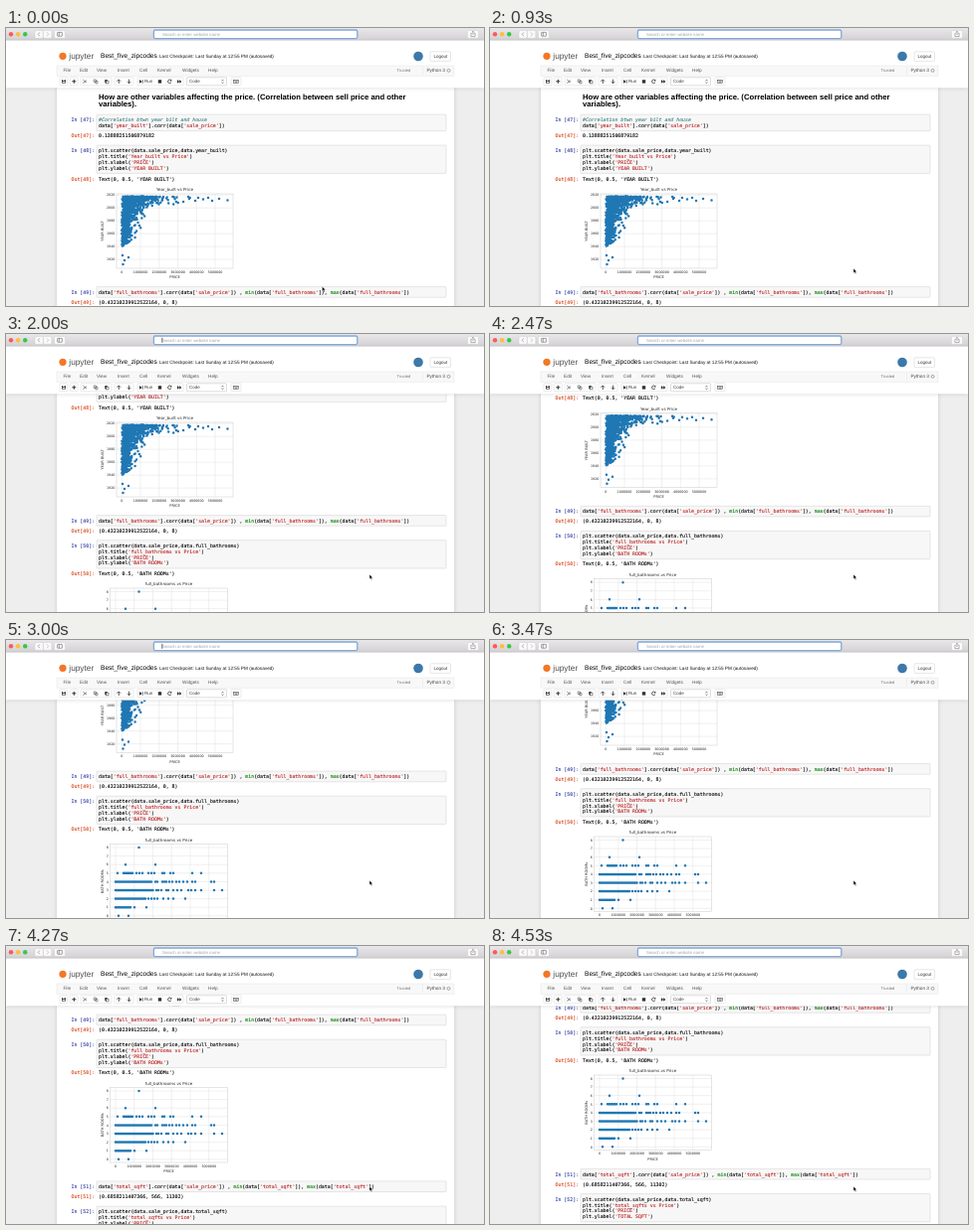
An HTML page for the animation above (4790 ms loop, 480x280 px).

```html
<!DOCTYPE html>
<html lang="en">
<head>
<meta charset="utf-8">
<title>Notebook scroll</title>
<style>
html, body { margin: 0; width: 100%; height: 100%; overflow: hidden; background: #fff; }
svg { display: block; width: 100vw; height: 100vh; }
text { font-family: "Liberation Sans", Arial, sans-serif; white-space: pre; text-rendering: geometricPrecision; }
.code { font: 4.9px "DejaVu Sans Mono", monospace; }
.code, .code tspan { fill: currentColor; stroke: currentColor; stroke-width: .1px; }
.plot { font: 3.3px "DejaVu Sans", sans-serif; fill: #262626; }
.raised { filter: drop-shadow(0 0 2px rgba(87, 87, 87, .25)); }
</style>
</head>
<body>
<svg id="stage" viewBox="0 0 480 280" xmlns="http://www.w3.org/2000/svg">
  <defs>
    <linearGradient id="bar" x2="0" y2="1"><stop stop-color="#e9e7e9"/><stop offset="1" stop-color="#d3d1d3"/></linearGradient>
    <clipPath id="view"><rect x="51" y="60.5" width="399" height="220"/></clipPath>
  </defs>
  <rect width="480" height="280" fill="#eee"/>
  <rect class="raised" x="51" y="50" width="399" height="240" fill="#fff"/>
  <g clip-path="url(#view)"><g id="page"></g></g>
  <g id="header"></g>
  <g id="chrome"></g>
  <path id="caret" d="M156.8 3.8v5" stroke="#222" stroke-width=".7"/>
  <path id="mouse" d="M0 0v4.6l1.1-1 .8 1.8.8-.4-.8-1.7h1.5z" fill="#000" stroke="#fff" stroke-width=".35"/>
</svg>
<script>
const LOOP = 4790, FRAME = 1000 / 15;
const $ = id => document.getElementById(id);
const esc = s => s.replace(/&/g, '&amp;').replace(/</g, '&lt;');

const text = (x, y, s, size, fill = '#333', extra = '') =>
  `<text x="${x}" y="${y}" font-size="${size}" fill="${fill}" ${extra}>${esc(s)}</text>`;
const rect = (x, y, w, h, fill, extra = '') =>
  `<rect x="${x}" y="${y}" width="${w}" height="${h}" fill="${fill}" ${extra}/>`;
const circle = (x, y, r, fill, extra = '') =>
  `<circle cx="${x}" cy="${y}" r="${r}" fill="${fill}" ${extra}/>`;
const line = (d, stroke = '#333', w = .6) =>
  `<path d="${d}" fill="none" stroke="${stroke}" stroke-width="${w}"/>`;
const shape = (d, fill = '#333') => `<path d="${d}" fill="${fill}"/>`;

// Notebook cells
const LEAD = 5.87, BASE = 1.5;
const code = (x, y, body, extra = '') => `<text class="code" x="${x}" y="${y}" ${extra}>${body}</text>`;
const span = (color, s, extra = '') => `<tspan color="${color}" ${extra}>${s}</tspan>`;

function paint(src) {
  if (src[0] === '#') return span('#408080', esc(src), 'font-style="italic"');
  return esc(src)
    .replace(/'[^']*'/g, s => span('#ba2121', s))
    .replace(/\b(min|max)(?=\()/g, s => span('#008000', s));
}

const prompt = (label, y, color) => code(89.1, y + BASE, label, `text-anchor="end" color="${color}"`);

function input(n, y, lines) {
  const h = lines.length * LEAD + 4.8;
  return prompt(`In [${n}]:`, y, '#303f9f') +
    rect(91, y - 5.6, 351, h, '#f7f7f7', 'stroke="#cfcfcf" stroke-width=".5" rx=".6"') +
    lines.map((s, i) => code(93, y + BASE + i * LEAD, paint(s))).join('');
}

const output = (n, y, s) => prompt(`Out[${n}]:`, y, '#d84315') + code(93, y + BASE, esc(s));

const corr = col => [`data['${col}'].corr(data['sale_price']) , min(data['${col}']), max(data['${col}'])`];
const scatter = (col, title, label) => [
  `plt.scatter(data.sale_price,data.${col})`,
  `plt.title('${title}')`, `plt.xlabel('PRICE')`, `plt.ylabel('${label}')`
];

// Plots
function plot({ x, y, w, h, title, label, x0, ticks, first, gap, dots }) {
  const mid = x + w / 2, grid = [];
  let out = '';
  for (let i = 0; i < 6; i++) {
    const gx = x0 + i * 18.75;
    grid.push(`M${gx} ${y}v${h}`);
    out += `<text class="plot" x="${gx}" y="${y + h + 4.9}" text-anchor="middle">${i ? i + '000000' : 0}</text>`;
  }
  ticks.forEach((s, i) => {
    const gy = first + i * gap;
    grid.push(`M${x} ${gy}h${w}`);
    out += `<text class="plot" x="${x - 1.6}" y="${gy + 1.2}" text-anchor="end">${s}</text>`;
  });
  const cy = y + h / 2;
  return line(grid.join(''), '#d9d9d9', .4) +
    rect(x, y, w, h, 'none', 'stroke="#ccc" stroke-width=".5"') +
    `<path d="${dots.map(p => `M${p[0].toFixed(1)} ${p[1].toFixed(1)}h0`).join('')}" stroke="#1f77b4" stroke-width="2.5" stroke-linecap="round"/>` +
    out +
    `<text class="plot" x="${mid}" y="${y - 2.8}" text-anchor="middle" style="font-size:4.1px">${title}</text>` +
    `<text class="plot" x="${mid}" y="${y + h + 10.2}" text-anchor="middle" style="font-size:3.6px">PRICE</text>` +
    `<text class="plot" transform="translate(98.4 ${cy}) rotate(-90)" text-anchor="middle" style="font-size:3.6px">${label}</text>`;
}

function seeded(s) {
  return () => (s = (s * 16807) % 2147483647) / 2147483647;
}

function yearDots() {
  const rnd = seeded(47), dots = [];
  for (let i = 0; i < 1000; i++) {
    const d = rnd() ** 2.1;
    const spread = 1.2 + 8 * Math.exp(-d * 3.2);
    const x = 116 - spread * Math.log(rnd() * rnd());
    if (x < 200 - d * 90) dots.push([x, 170 + d * 54]);
  }
  for (const p of [[184, 172], [190, 174], [193, 171], [198, 172.5], [207, 174], [214, 172], [222.5, 173.5],
    [203, 171], [117.5, 238], [119, 234], [123, 231], [117, 229]]) dots.push(p);
  return dots;
}

function bathDots(first, gap) {
  const rows = [
    [8, 0, 0, [133.5]],
    [6, 0, 0, [120, 150]],
    [5, 118, 127, [112, 131, 134, 137, 143, 146, 149, 157, 159, 165, 168, 187, 196]],
    [4, 110, 147, [150, 152, 157, 159, 161, 164, 167, 171, 174, 178, 182, 187, 190, 206, 209]],
    [3, 110, 148, [151, 153, 156, 161, 163, 168, 172, 176, 183, 186, 190, 196, 209, 217]],
    [2, 110, 140, [143, 146, 149, 152, 158, 163, 168, 180]],
    [1, 110, 126, [129, 141]],
    [0, 0, 0, [113, 123]]
  ];
  const dots = [];
  for (const [n, a, b, more] of rows) {
    const y = first + (8 - n) * gap;
    for (let x = a; a && x <= b; x += 1.5) dots.push([x, y]);
    for (const x of more) dots.push([x, y]);
  }
  return dots;
}

const bold = 'font-weight="bold"';
$('page').innerHTML =
  text(93, 71.6, 'How are other variables affecting the price. (Correlation between sell price and other', 7.7, '#000', bold) +
  text(93, 79.2, 'variables).', 7.7, '#000', bold) +
  input(47, 92.7, ['#Correlation btwn year bilt and house', `data['year_built'].corr(data['sale_price'])`]) +
  output(47, 108.5, '0.13888251506879182') +
  input(48, 123.7, scatter('year_built', 'Year_built vs Price', 'YEAR BUILT')) +
  output(48, 152, `Text(0, 0.5, 'YEAR BUILT')`) +
  plot({ x: 111, y: 167, w: 117, h: 75, title: 'Year_built vs Price', label: 'YEAR BUILT', x0: 116.3,
    ticks: [2020, 2000, 1980, 1960, 1940, 1920], first: 168.2, gap: 13, dots: yearDots() }) +
  input(49, 266.2, corr('full_bathrooms')) +
  output(49, 276.3, '(0.43210239912522164, 0, 8)') +
  input(50, 291.3, scatter('full_bathrooms', 'full_bathrooms vs Price', 'BATH ROOMs')) +
  output(50, 319.3, `Text(0, 0.5, 'BATH ROOMs')`) +
  plot({ x: 104.5, y: 334, w: 118, h: 75.5, title: 'full_bathrooms vs Price', label: 'BATH ROOMs', x0: 110,
    ticks: [8, 7, 6, 5, 4, 3, 2, 1, 0], first: 337.5, gap: 8.6, dots: bathDots(337.5, 8.6) }) +
  input(51, 434, corr('total_sqft')) +
  output(51, 444.4, '(0.6858211407366, 566, 11302)') +
  input(52, 459.2, scatter('total_sqft', 'total_sqfts vs Price', 'TOTAL SQFT'));

// Notebook header
const menu = [['File', 57.5], ['Edit', 74], ['View', 91], ['Insert', 112], ['Cell', 134], ['Kernel', 152], ['Widgets', 177], ['Help', 203]];
const button = (x, w) => rect(x, 49.8, w, 8, '#fff', 'stroke="#ccc" stroke-width=".4" rx=".7"');
$('header').innerHTML =
  rect(0, 12, 480, 48.3, '#fff', 'class="raised"') +
  circle(57, 28.3, 3.6, '#f37726') +
  text(63.3, 30.6, 'jupyter', 8.3, '#4e4e4e') +
  text(95, 30.4, 'Best_five_zipcodes', 6.6, '#000') +
  text(154, 30.2, 'Last Checkpoint: Last Sunday at 12:55 PM (autosaved)', 4.7, '#111') +
  circle(414, 28.5, 4.8, '#3c78aa') +
  rect(426, 23.8, 20.5, 9.6, '#fff', 'stroke="#ccc" stroke-width=".5" rx="1"') +
  text(429.5, 30.2, 'Logout', 4.5) +
  rect(51, 38, 399, 10.2, '#f8f8f8', 'stroke="#e3e3e3" stroke-width=".5"') +
  menu.map(([s, x]) => text(x, 44.4, s, 4.7, '#555')).join('') +
  text(392.6, 44.3, 'Trusted', 4.1, '#777') +
  line('M418.5 39v8', '#ddd', .4) +
  text(422.4, 44.4, 'Python 3', 4.7, '#444') +
  circle(444.5, 42.8, 1.5, 'none', 'stroke="#555" stroke-width=".5"') +
  [[54, 8], [64.3, 8], [75, 31], [109, 19], [132, 46]].map(b => button(...b)).join('') +
  rect(56, 52, 3.8, 3.6, '#333') + rect(56.9, 52, 1.8, 1.2, '#fff') + rect(56.8, 54, 2.2, 1.1, '#fff') +
  line('M66.3 53.8h4M68.3 51.8v4', '#333', 1) +
  line('M77.3 52l3.6 3M77.3 55.6l3.6-3') +
  line('M88.2 52h2.2v2.4h-2.2zM89.8 53.4h2.2v2.4h-2.2z', '#333', .5) +
  rect(99.2, 52, 2.6, 3.2, '#444') + rect(100.6, 53.2, 2.4, 2.7, '#fff', 'stroke="#333" stroke-width=".5"') +
  line('M113.3 56v-4M111.5 53.7l1.8-1.8 1.8 1.8', '#333', .8) +
  line('M123.5 51.7v4M121.7 54l1.8 1.8 1.8-1.8', '#333', .8) +
  shape('M134 52l2.8 1.9-2.8 1.9z') + line('M137.3 52v3.8') + text(139, 55.4, 'Run', 4.5) +
  rect(152.8, 52.2, 3.4, 3.4, '#333') +
  line('M165.8 52.7a1.8 1.8 0 1 0 .2 1.9', '#333', .8) + shape('M166.4 51.5v2h-2z') +
  shape('M172 52l2.2 1.9-2.2 1.9zM174.2 52l2.2 1.9-2.2 1.9z') +
  rect(181.5, 49.8, 40, 8, '#fff', 'stroke="#bbb" stroke-width=".5" rx=".7"') +
  text(184, 55.4, 'Code', 4.5, '#444') +
  line('M216.5 53.2l1-1.2 1 1.2M216.5 54.6l1 1.2 1-1.2', '#444', .6) +
  button(226, 10) +
  rect(228.4, 52.3, 5.2, 3.3, 'none', 'stroke="#333" stroke-width=".5"') +
  line('M229.2 53.3h3.7M229.8 54.6h2.5', '#333', .5);

// Browser bar
const key = (x, w) => rect(x, 2.4, w, 7.8, '#fafafa', 'stroke="#c9c7c9" stroke-width=".4" rx="1"');
$('chrome').innerHTML =
  rect(0, 0, 480, 12, 'url(#bar)') + rect(0, 11.8, 480, .6, '#b5b3b5') +
  ['#fc5b57', '#fdbd3f', '#34c84a'].map((c, i) => circle(5 + i * 7.1, 6.2, 2.2, c)).join('') +
  key(29, 8.2) + key(37.6, 8.2) + key(48.5, 11) + key(463.5, 11) +
  line('M33.9 4.4l-1.7 1.9 1.7 1.9', '#777', .6) + line('M41 4.4l1.7 1.9-1.7 1.9', '#aaa', .6) +
  rect(51.6, 4.4, 4.8, 3.8, 'none', 'stroke="#666" stroke-width=".6" rx=".4"') + line('M53.3 4.4v3.8', '#666', .6) +
  line('M467.8 5.4h-.9v3.2h4.2v-3.2h-.9M469 7v-3.6M467.9 4.4l1.1-1.1 1.1 1.1', '#666', .5) +
  rect(148.4, 2, 204.4, 8.6, '#fff', 'stroke="#7fa9dc" stroke-width="1.3" rx="1.5"') +
  text(157, 7.8, 'Search or enter website name', 4.35, '#a4a4a4');

// Motion
const path = [[1140, 0], [1470, 31], [2000, 78], [2130, 80], [2270, 80], [2470, 87.5],
  [3000, 128.5], [3330, 136], [3600, 136], [4000, 169], [4530, 204]];
const slope = i => (path[i + 1][1] - path[i][1]) / (path[i + 1][0] - path[i][0]);
const tangents = path.map((_, i) => {
  if (!i || i === path.length - 1) return 0;
  const a = slope(i - 1), b = slope(i);
  return a * b > 0 ? 2 * a * b / (a + b) : 0;
});

function scrollAt(t) {
  const n = path.length - 1;
  if (t <= path[0][0]) return 0;
  if (t >= path[n][0]) return path[n][1];
  const i = path.findIndex(p => p[0] > t) - 1;
  const [t0, a] = path[i], [t1, b] = path[i + 1];
  const h = t1 - t0, u = (t - t0) / h, v = 1 - u;
  return a * (1 + 2 * u) * v * v + h * tangents[i] * u * v * v +
    b * u * u * (3 - 2 * u) - h * tangents[i + 1] * u * u * v;
}

function render(ms) {
  const t = Math.floor((ms % LOOP + 4) / FRAME) * FRAME;
  $('page').setAttribute('transform', `translate(0 ${-scrollAt(t).toFixed(2)})`);
  const u = Math.min(1, Math.max(0, (t - 280) / 520)), e = u * u * (3 - 2 * u);
  $('mouse').setAttribute('transform', `translate(${317.5 + 47.5 * e} ${260.5 - 18.3 * e})`);
  const blink = Math.floor((t - 394) / 536);
  $('caret').setAttribute('visibility', blink >= 0 && blink % 2 === 0 ? 'visible' : 'hidden');
}

const start = performance.now();
function tick() {
  render(performance.now() - start);
  requestAnimationFrame(tick);
}
tick();
</script>
</body>
</html>
```
